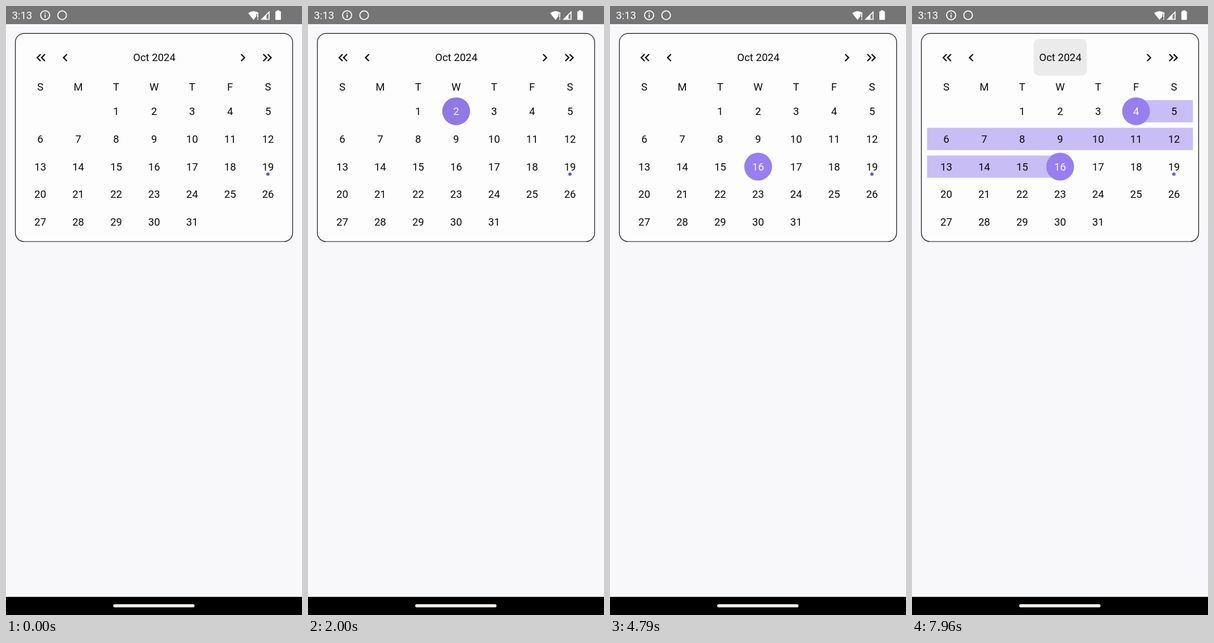
Recreate the animation shown at these times as an HTML page with a canvas. Size 522x1073 px, loop 8000 ms.

```html
<!DOCTYPE html>
<html lang="en">
<head>
<meta charset="utf-8">
<title>Date range calendar</title>
<style>
html, body { margin: 0; width: 100%; height: 100%; overflow: hidden; background: #f8f8fb; }
canvas { display: block; width: 522px; height: 1073px; }
</style>
</head>
<body>
<canvas id="stage"></canvas>
<script>
const W = 522, H = 1073, LOOP = 8000;
const COL = 66.95, ROW = 48.8, X0 = 60.4, Y0 = 185.4, LEFT = 26.5;
const MONTHS = 'Jan Feb Mar Apr May Jun Jul Aug Sep Oct Nov Dec'.split(' ');
const canvas = document.getElementById('stage');
const ctx = canvas.getContext('2d');
const dpr = window.devicePixelRatio || 1;
canvas.width = W * dpr;
canvas.height = H * dpr;

// Calendar states: start time, year, month, selected range
const STATES = [
  { at: 0, y: 2024, m: 9 },
  { at: 1740, y: 2024, m: 9, from: 2, to: 2 },
  { at: 2890, y: 2024, m: 9, from: 2, to: 18 },
  { at: 4400, y: 2024, m: 9, from: 16, to: 16 },
  { at: 5360, y: 2024, m: 9, from: 4, to: 16 },
  { at: 6580, y: 2024, m: 10 },
  { at: 6870, y: 2025, m: 10 },
  { at: 7810, y: 2024, m: 9, from: 4, to: 16 }
];
const DAY_TAPS = [[1670, 2], [2820, 18], [4330, 16], [5290, 4]];

const clamp = v => Math.max(0, Math.min(1, v));
const mix = (a, b, k) => a + (b - a) * k;

function rect(x, y, w, h, color) {
  ctx.fillStyle = color;
  ctx.fillRect(x, y, w, h);
}

function disc(x, y, r, color) {
  ctx.fillStyle = color;
  ctx.beginPath();
  ctx.arc(x, y, r, 0, Math.PI * 2);
  ctx.fill();
}

function ring(x, y, r, color) {
  ctx.strokeStyle = color;
  ctx.lineWidth = 1.8;
  ctx.beginPath();
  ctx.arc(x, y, r, 0, Math.PI * 2);
  ctx.stroke();
}

function rounded(x, y, w, h, r) {
  ctx.beginPath();
  ctx.roundRect(x, y, w, h, r);
}

function poly(points, color) {
  ctx.fillStyle = color;
  ctx.beginPath();
  points.forEach(([x, y]) => ctx.lineTo(x, y));
  ctx.fill();
}

function text(str, x, y, color = '#0a0a0a', align = 'center') {
  ctx.fillStyle = color;
  ctx.textAlign = align;
  ctx.fillText(str, x, y);
}

// Touch ripple: grows and fades in, then fades out
function ripple(t, start, x, y, r, alpha, dx = 0) {
  const e = t - start;
  if (e < 0 || e > 425) return;
  const grow = clamp(e / 225);
  const a = alpha * clamp(e / 75) * (1 - clamp((e - 225) / 200));
  disc(x + dx * (1 - grow), y, r * mix(0.3, 1, grow), `rgba(0,0,0,${a})`);
}

function chevron(tip, dir) {
  ctx.strokeStyle = '#0a0a0a';
  ctx.lineWidth = 2.3;
  ctx.beginPath();
  ctx.moveTo(tip - dir * 6, 85);
  ctx.lineTo(tip, 91);
  ctx.lineTo(tip - dir * 6, 97);
  ctx.stroke();
}

function statusBar() {
  rect(0, 0, W, 32, '#757575');
  text('3:13', 10.5, 22.7, '#fff', 'left');
  ring(69, 16.3, 8, '#fff');
  rect(68.1, 15.3, 1.8, 5.3, '#fff');
  rect(68.1, 11.7, 1.8, 1.9, '#fff');
  ring(99, 16.3, 7.6, '#fff');

  ctx.fillStyle = '#fff';
  ctx.beginPath();
  ctx.moveTo(436.5, 24.5);
  ctx.lineTo(427, 12.5);
  ctx.quadraticCurveTo(436.5, 5.5, 446, 12.5);
  ctx.fill();
  rect(441.6, 13.6, 5, 11, '#757575');
  rect(443, 14, 1.8, 6.5, '#fff');
  rect(443, 22, 1.8, 2, '#fff');

  poly([[449, 24.3], [464.8, 24.3], [464.8, 8.6]], '#fff');
  poly([[459.3, 22.7], [463.2, 22.7], [463.2, 12.6], [459.3, 16.4]], '#858585');

  ctx.fillStyle = '#fff';
  rounded(475, 9.2, 9.8, 15.3, 1.2);
  ctx.fill();
  rect(477.6, 7.6, 4.6, 2, '#fff');
}

function navBar() {
  rect(0, 1041, W, 32, '#000');
  ctx.fillStyle = '#f3efef';
  rounded(189, 1054, 143.5, 5.6, 2.8);
  ctx.fill();
}

function header(t, s) {
  ripple(t, 6510, 417, 90.5, 21.3, 0.07);
  ripple(t, 6800, 461, 90.5, 21.3, 0.07, -6);
  ctx.save();
  rounded(214.5, 58, 93.8, 64.7, 9);
  ctx.clip();
  ripple(t, 7740, 261.4, 90.5, 58, 0.07);
  ctx.restore();

  [55, 62.8, 101.5].forEach(x => chevron(x, -1));
  [420.7, 459.8, 467.5].forEach(x => chevron(x, 1));
  text(`${MONTHS[s.m]} ${s.y}`, 261.5, 97.2);
  [...'SMTWTFS'].forEach((d, i) => text(d, X0 + i * COL, 148.5));
}

function month(t, s, first, days) {
  const place = d => {
    const i = first + d - 1, c = i % 7;
    return { c, x: X0 + c * COL, y: Y0 + Math.floor(i / 7) * ROW };
  };
  const isEnd = d => d === s.from || d === s.to;

  // Range bands, one run per week
  for (let d = s.from; d <= s.to && s.from < s.to;) {
    const p = place(d);
    const last = Math.min(s.to, d + 6 - p.c), q = place(last);
    const x1 = d === s.from ? p.x : LEFT;
    const x2 = last === s.to ? q.x : 495.4;
    rect(x1, p.y - 19.6, x2 - x1, 39.2, '#c9bdf5');
    d = last + 1;
  }
  for (let d = 1; d <= days; d++) {
    const { x, y } = place(d);
    if (isEnd(d)) disc(x, y, 24.5, '#977ff1');
    text(d, x, y + 6.6, isEnd(d) ? '#fff' : '#0a0a0a');
    if (s.y === 2024 && s.m === 9 && d === 19) disc(x - 0.2, y + 13.2, 2.9, '#7255cf');
  }
  if (s.m === 9) {
    DAY_TAPS.forEach(([at, d]) => {
      const { x, y } = place(d);
      ripple(t, at, x, y, 24.5, 0.1);
    });
  }
}

function draw(t) {
  const s = STATES.filter(st => st.at <= t).pop();
  const first = new Date(s.y, s.m, 1).getDay();
  const days = new Date(s.y, s.m + 1, 0).getDate();
  const rows = Math.ceil((first + days) / 7);

  ctx.setTransform(dpr, 0, 0, dpr, 0, 0);
  ctx.font = '18.5px Roboto, sans-serif';
  rect(0, 0, W, H, '#f8f8fb');
  statusBar();
  navBar();

  ctx.fillStyle = '#fdfdfe';
  ctx.strokeStyle = '#111';
  ctx.lineWidth = 1.2;
  rounded(16.5, 48.4, 489, 122.6 + rows * ROW, 15.5);
  ctx.fill();
  ctx.stroke();

  header(t, s);
  month(t, s, first, days);
}

const begin = performance.now();
function loop() {
  draw((performance.now() - begin) % LOOP);
  requestAnimationFrame(loop);
}
loop();
</script>
</body>
</html>
```
